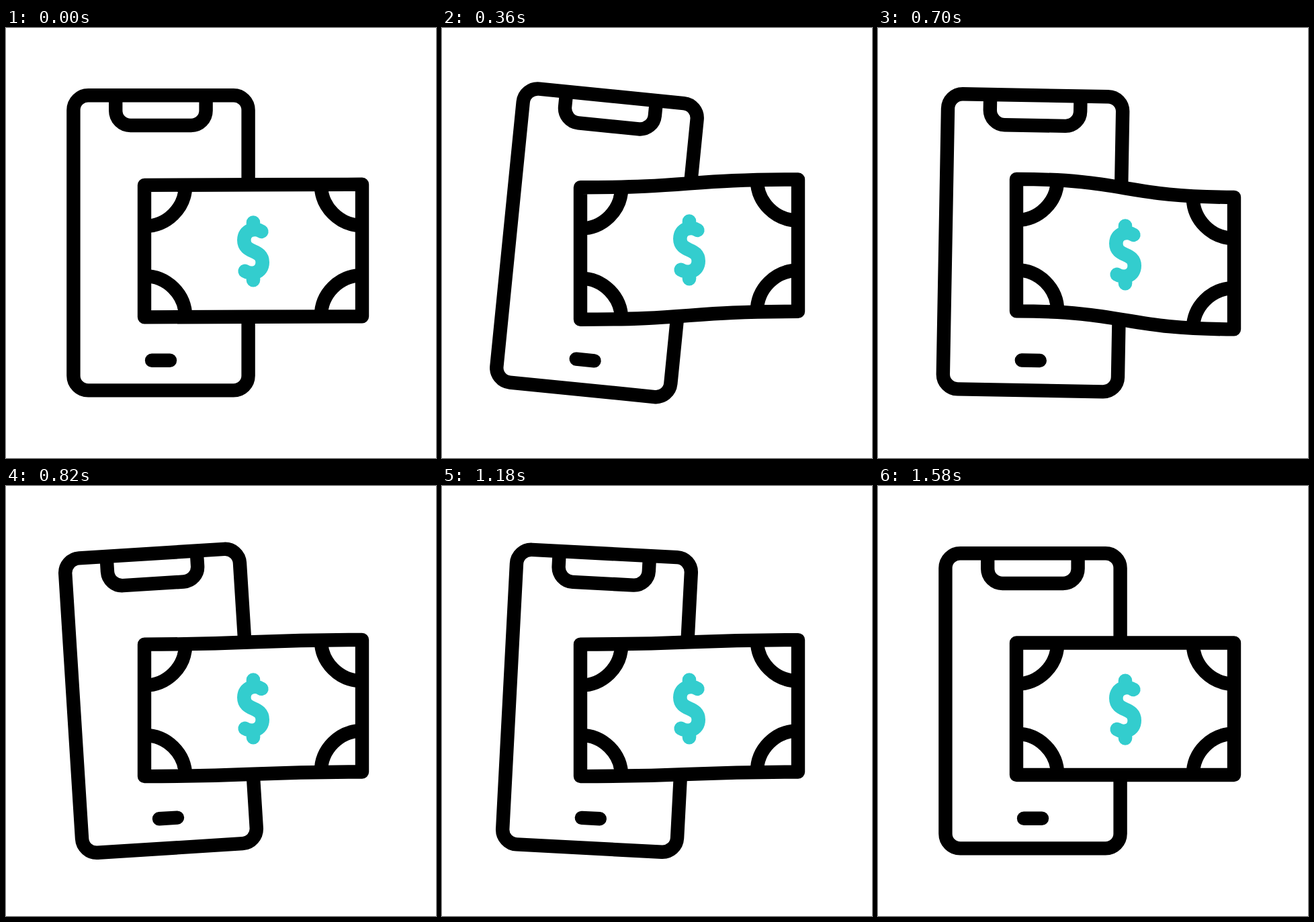
Animation of 640 by 640 pixels, one loop 1.6 s. Source, as an HTML page:

```html
<!DOCTYPE html>
<html lang="en">
<head>
<meta charset="utf-8">
<title>Mobile cash</title>
<style>
  html, body { margin: 0; width: 100%; height: 100%; overflow: hidden; background: #fff; }
  svg { display: block; width: 100vw; height: 100vh; }
  path, rect { fill: none; stroke: #000; stroke-width: 20.4; stroke-linejoin: round; }
  .round { stroke-linecap: round; }
  #bill { fill: #fff; }
  #dollar path { stroke: #33cdce; stroke-width: 20.6; }
</style>
</head>
<body>
<svg viewBox="0 0 640 640">
  <g id="phone">
    <rect x="100.4" y="100.2" width="260.2" height="439.2" rx="22"/>
    <path d="M163.2 100V123a22 22 0 0 0 22 22H275.6a22 22 0 0 0 22-22V100"/>
    <path class="round" d="M217 494.8H244"/>
  </g>
  <path id="bill"/>
  <path id="arcsLeft" d="M267.2 233.5A61.2 61.2 0 0 1 206 294.7M206 368.8A61.2 61.2 0 0 1 267.2 430"/>
  <path id="arcsRight" d="M468.8 233.5A61.2 61.2 0 0 0 530 294.7M530 368.8A61.2 61.2 0 0 0 468.8 430"/>
  <g id="dollar">
    <path class="round" d="M380.3 303C371 297 354.3 300 354.3 316C354.3 326 361 329.5 368 332.5C375 335.5 381.7 339 381.7 349C381.7 365 365 368 355.7 362M368 289.7V300M368 365V375.4"/>
  </g>
</svg>
<script>
  const LOOP = 1600;
  // [time in ms, value], eased between neighbours
  const TILT = [[100, 0], [504, 8], [860, -4], [1210, 3.15], [1380, 0]];
  const WAVE = [[-20, 0], [200, -27.5], [600, 27], [1000, -27.5], [1400, 26.3], [1580, 0]];
  const LEFT = 206, RIGHT = 530, TOP = 233.5, BOTTOM = 430, BEND = 165;

  const el = id => document.getElementById(id);
  const phone = el('phone'), bill = el('bill'), dollar = el('dollar');
  const arcsLeft = el('arcsLeft'), arcsRight = el('arcsRight');

  function valueAt(keys, t) {
    if (t <= keys[0][0]) return keys[0][1];
    for (let i = 1; i < keys.length; i++) {
      const [t0, a] = keys[i - 1], [t1, b] = keys[i];
      if (t < t1) {
        const p = (t - t0) / (t1 - t0);
        return a + (b - a) * p * p * (3 - 2 * p);
      }
    }
    return keys[keys.length - 1][1];
  }

  const shiftY = (node, y) => node.setAttribute('transform', `translate(0 ${y})`);

  function draw(t) {
    phone.setAttribute('transform', `rotate(${valueAt(TILT, t)} 230.5 319.8)`);

    const right = valueAt(WAVE, t), left = -0.47 * right;
    const x1 = LEFT + BEND, x2 = RIGHT - BEND;
    const tl = TOP + left, tr = TOP + right, bl = BOTTOM + left, br = BOTTOM + right;
    bill.setAttribute('d',
      `M${LEFT} ${tl}C${x1} ${tl} ${x2} ${tr} ${RIGHT} ${tr}` +
      `V${br}C${x2} ${br} ${x1} ${bl} ${LEFT} ${bl}Z`);
    shiftY(arcsLeft, left);
    shiftY(arcsRight, right);
    shiftY(dollar, (left + right) / 2);
  }

  const start = performance.now();
  function tick() {
    draw((performance.now() - start) % LOOP);
    requestAnimationFrame(tick);
  }
  draw(0);
  requestAnimationFrame(tick);
</script>
</body>
</html>
```
